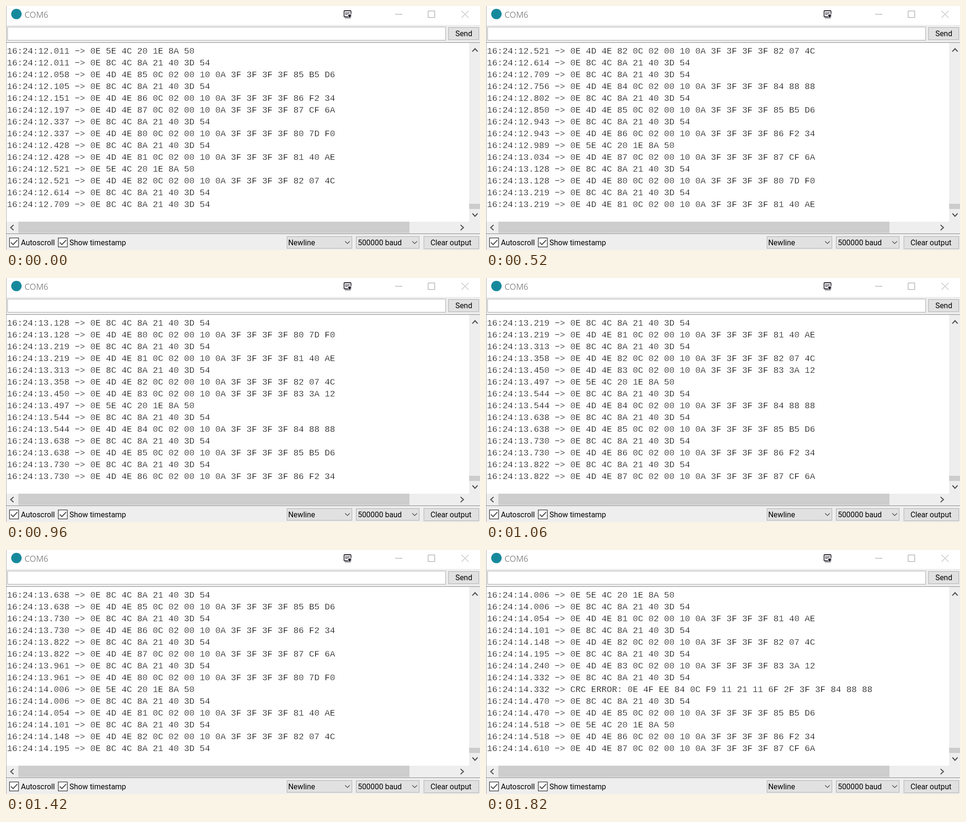
An HTML page for the animation above (1940 ms loop, 1001 px wide and 517 px high).

```html
<!DOCTYPE html>
<html lang="en">
<head>
<meta charset="utf-8">
<title>Serial monitor</title>
<style>
html, body { margin: 0; width: 100%; height: 100%; overflow: hidden; background: #fff; }
svg { display: block; }
.ui { font: 15.9px Roboto, "Noto Sans", sans-serif; fill: #000; }
.title { font: 17.6px "Open Sans", "Noto Sans", sans-serif; fill: #8c8c8c; }
.log { font: 18.333px "Liberation Mono", "Courier New", monospace; fill: #000; stroke: #fff; stroke-width: .45px; }
.line { fill: none; stroke: #999; }
.arrow { fill: none; stroke: #505050; stroke-width: 2.2; }
.chevron { fill: none; stroke: #444; stroke-width: 1.2; }
.tick { fill: none; stroke: #222; stroke-width: 1.7; }
.button { fill: #e1e1e1; stroke: #adadad; }
.box { fill: #fff; stroke: #333; stroke-width: 1.3; }
.thumb { fill: #cdcdcd; }
</style>
</head>
<body>
<svg width="1001" height="517" viewBox="0 0 1001 517">
  <rect width="1001" height="517" fill="#fff"/>

  <circle cx="22" cy="17" r="11" fill="#17899c"/>
  <text class="title" x="39" y="25">COM6</text>
  <g fill="none" stroke="#2d2935">
    <rect x="714" y="10" width="14.500" height="13" rx="1" stroke-width="1.8"/>
    <path d="M717.500 13v6M720 13v6M722.500 13v6M725 13v3M716 25.500h12" stroke-width="1.2"/>
    <path d="M722.500 17.500h6.500v4a3 3 0 0 1-6.500 0z" fill="#2d2935" stroke="#fff"/>
  </g>
  <path class="line" d="M822 17.500h15M891.500 10.500h14v14h-14zM962 10l15 15M977 10l-15 15"/>

  <rect y="40" width="1001" height="37" fill="#eee"/>
  <rect x="3.500" y="44.500" width="925" height="28" fill="#fff" stroke="#a6a6a6"/>
  <rect class="button" x="934.500" y="45.500" width="64" height="26"/>
  <text class="ui" x="949" y="64">Send</text>

  <rect x="978" y="78" width="23" height="379" fill="#eee"/>
  <rect class="thumb" x="978" y="419" width="23" height="11"/>
  <rect y="457" width="1001" height="25" fill="#eee"/>
  <rect class="thumb" x="26" y="457" width="826" height="24"/>
  <path class="arrow" d="M985 96.500l5.500-6 5.500 6M985 439.500l5.500 6 5.500-6M16 464l-6 5.500 6 5.500M960 464l6 5.500-6 5.500"/>

  <rect y="482" width="1001" height="35" fill="#eee"/>
  <path d="M0 77.500h1001M0 482.500h1001" stroke="#82868c"/>
  <path d="M.5 0v517" stroke="#a8a8a8"/>

  <rect class="box" x="7.500" y="491.500" width="19" height="19"/>
  <rect class="box" x="110.500" y="491.500" width="19" height="19"/>
  <path class="tick" d="M10.500 501l4.500 4.500 9-9.500M113.500 501l4.500 4.500 9-9.500"/>
  <text class="ui" x="31.500" y="507">Autoscroll</text>
  <text class="ui" x="134" y="507">Show timestamp</text>

  <rect class="button" x="593.500" y="488.500" width="137" height="25"/>
  <rect class="button" x="739.500" y="488.500" width="133" height="25"/>
  <rect class="button" x="882.500" y="488.500" width="116" height="26"/>
  <path class="chevron" d="M716 498.500l5 5 5-5M858 498.500l5 5 5-5"/>
  <text class="ui" x="596" y="507">Newline</text>
  <text class="ui" x="743" y="507">500000 baud</text>
  <text class="ui" x="896.500" y="507">Clear output</text>

  <g id="log" class="log"></g>
</svg>
<script>
const LOOP = 1940, ROWS = 14, ROW_HEIGHT = 25;

const checksums = {
  80: "7D F0", 81: "40 AE", 82: "07 4C", 83: "3A 12",
  84: "88 88", 85: "B5 D6", 86: "F2 34", 87: "CF 6A"
};
const specials = {
  p: "0E 5E 4C 20 1E 8A 50",
  s: "0E 8C 4C 8A 21 40 3D 54",
  e: "CRC ERROR: 0E 4F EE 84 0C F9 11 21 11 6F 2F 3F 3F 84 88 88"
};
const message = key => specials[key] ||
  `0E 4D 4E ${key} 0C 02 00 10 0A 3F 3F 3F 3F ${key} ${checksums[key]}`;

// Each entry: seconds, then the messages that arrived at that moment.
const log = `12.011 p s|12.058 85|12.105 s|12.151 86|12.197 87|12.337 s 80|12.428 s 81
12.521 p 82|12.614 s|12.709 s|12.756 84|12.802 s|12.850 85|12.943 s 86|12.989 p
13.034 87|13.128 s 80|13.219 s 81|13.313 s|13.358 82|13.450 83|13.497 p|13.544 s 84
13.638 s 85|13.730 s 86|13.822 s 87|13.961 s 80|14.006 p s|14.054 81|14.101 s|14.148 82
14.195 s|14.240 83|14.332 s e|14.470 s 85|14.518 p 86|14.610 87`
  .split(/[|\n]/)
  .flatMap(entry => {
    const [time, ...keys] = entry.split(" ");
    return keys.map(key => `16:24:${time} \u2212> ${message(key)}`);
  });

// Time in ms and the number of lines scrolled off the top from then on.
const scrolls = [
  [0, 0], [70, 2], [140, 3], [210, 5], [290, 7], [360, 9], [520, 11],
  [600, 13], [740, 15], [820, 17], [890, 19], [960, 21],
  [1060, 23], [1200, 25], [1270, 27], [1340, 29], [1420, 31], [1500, 32], [1580, 34],
  [1750, 38], [1820, 39]
];

const group = document.getElementById("log");
const rows = Array.from({ length: ROWS }, (_, i) => {
  const row = document.createElementNS("http://www.w3.org/2000/svg", "text");
  row.setAttribute("x", 2);
  row.setAttribute("y", 101 + i * ROW_HEIGHT);
  return group.appendChild(row);
});

let shown = -1;
function render(time) {
  const first = scrolls.findLast(([start]) => start <= time)[1];
  if (first === shown) return;
  shown = first;
  rows.forEach((row, i) => { row.textContent = log[first + i]; });
}

render(0);
const start = performance.now();
function tick() {
  render((performance.now() - start) % LOOP);
  requestAnimationFrame(tick);
}
requestAnimationFrame(tick);
</script>
</body>
</html>
```
